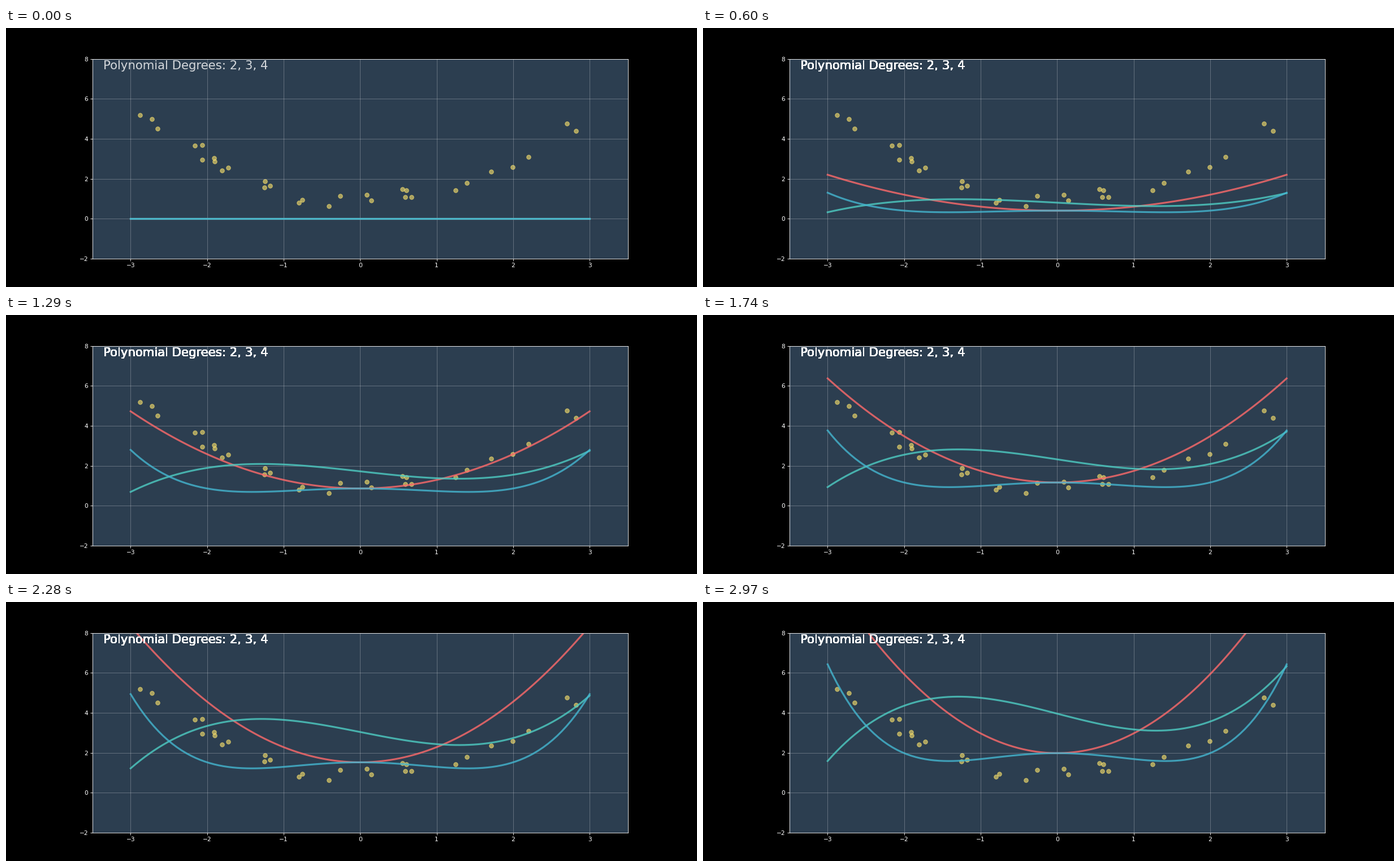
Recreate the animation shown at these times as a matplotlib script. Size 1222x458 px, loop 3 s.

```python
import numpy as np
import matplotlib.pyplot as plt
from matplotlib.animation import FuncAnimation

WIDTH, HEIGHT = 1222, 458
DPI = WIDTH / 16  # sixteen inches wide
FRAMES, INTERVAL = 100, 30

plt.style.use("dark_background")
plt.rcParams["font.family"] = "DejaVu Sans"

fig, ax = plt.subplots(figsize=(WIDTH / DPI, HEIGHT / DPI), dpi=DPI)
fig.patch.set_facecolor("black")
ax.set_facecolor("#2C3E50")
ax.set_xlim(-3.5, 3.5)
ax.set_ylim(-2, 8)
ax.grid(True, alpha=0.3)

# Noisy samples of a parabola
np.random.seed(42)
sample_x = np.random.rand(30) * 6 - 3
sample_y = 0.5 * sample_x**2 + 1 + 0.3 * np.random.randn(30)
ax.scatter(sample_x, sample_y, s=50, color="#FFE66D", alpha=0.6)

x = np.linspace(-3, 3, 100)
curves = [
    ("#FF6B6B", x**2 + 2),
    ("#4ECDC4", 0.2 * x**3 - x + 4),
    ("#45B7D1", 0.1 * x**4 - 0.4 * x**2 + 2),
]
lines = [ax.plot(x, 0 * x, color=color, lw=3, alpha=0.8)[0] for color, _ in curves]

# One more translucent caption is stacked per frame, so its edges fill in
captions = [
    ax.text(0.02, 0.95, "Polynomial Degrees: 2, 3, 4", transform=ax.transAxes,
            fontsize=20, color="white", alpha=0.8)
    for _ in range(FRAMES)
]


def update(frame):
    for line, (_, y) in zip(lines, curves):
        line.set_ydata(y * frame / FRAMES)
    for i, caption in enumerate(captions):
        caption.set_visible(i <= frame)
    return lines + captions


anim = FuncAnimation(fig, update, frames=FRAMES, interval=INTERVAL,
                     repeat=True, repeat_delay=0, blit=False)
plt.show()
```
